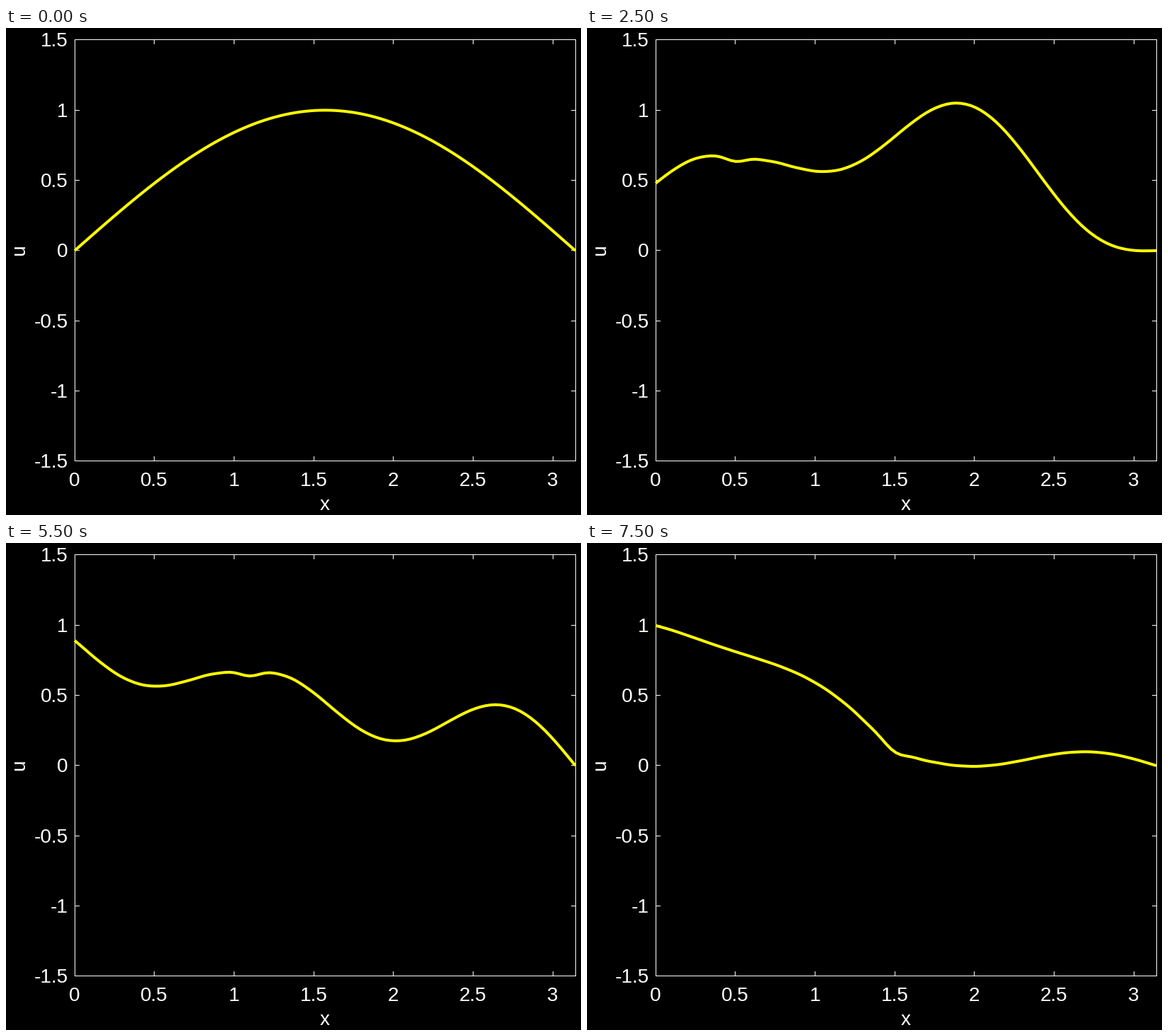
Animation, 813 px wide and 689 px high, one loop 8 s. Source, as a matplotlib script:

```python
import numpy as np
import matplotlib.pyplot as plt
from matplotlib.animation import FuncAnimation

W, H, DPI = 813, 689, 100
LEFT, RIGHT, TOP, BOTTOM = 97, 805, 17, 613
TICK = 7
FRAMES, STEP_MS, DT = 16, 500, 0.1
MODES = 40


def pt(px):
    return px * 72 / DPI


def sx(x):
    return LEFT + x / np.pi * (RIGHT - LEFT)


def sy(u):
    return BOTTOM + (u + 1.5) / 3 * (TOP - BOTTOM)


def wave(x, t):
    """Sine series for u_tt = u_xx with u(0,t) = sin t, u(pi,t) = 0,
    u(x,0) = sin x and u_t(x,0) = sin 4x."""
    u = (1 - x / np.pi) * np.sin(t)
    u += ((1 - t / np.pi) * np.cos(t) - np.sin(t) / np.pi) * np.sin(x)
    u += np.sin(4 * t) / 4 * np.sin(4 * x)
    n = np.arange(2, MODES + 1)
    b = 2 / (np.pi * (n**2 - 1)) * (np.sin(t) / n - np.sin(n * t))
    return u + b @ np.sin(np.outer(n, x))


fig = plt.figure(figsize=(W / DPI, H / DPI), dpi=DPI, facecolor="black")
ax = fig.add_axes([0, 0, 1, 1])
ax.set(xlim=(0, W), ylim=(H, 0))
ax.axis("off")


def rule(xs, ys):
    ax.plot(xs, ys, color="white", lw=pt(1), solid_capstyle="butt",
            snap=False, zorder=1)


def hline(x0, x1, y):
    y = np.ceil(round(y, 6)) - 0.5  # centre of a pixel row
    rule([x0, x1], [y, y])


def vline(x, y0, y1):
    x = np.floor(round(x, 6)) + 0.5  # centre of a pixel column
    rule([x, x], [y0, y1])


def label(x, y, s, **kw):
    ax.text(x, y, s, color="white", family="Liberation Sans",
            size=pt(28), va="baseline", **kw)


for y in (TOP, BOTTOM):
    hline(LEFT, RIGHT + 1, y)
for x in (LEFT, RIGHT):
    vline(x, TOP, BOTTOM)

for v in np.arange(0, 3.1, 0.5):
    x = sx(v)
    vline(x, BOTTOM, BOTTOM - TICK)
    vline(x, TOP, TOP + TICK - 1)
    label(x, 648, f"{v:g}", ha="center")

for v in np.arange(-1.5, 1.6, 0.5):
    y = sy(v)
    hline(LEFT, LEFT + TICK, y)
    hline(RIGHT, RIGHT - TICK + 1, y)
    label(87.5, y + 9.5, f"{v:g}", ha="right")

label(450.7, 682, "x", ha="center")
label(26.5, 314.5, "u", ha="center", rotation=90, rotation_mode="anchor")

grid = np.linspace(0, np.pi, 101)
curve, = ax.plot([], [], color="#ffff00", lw=pt(4), solid_capstyle="butt",
                 solid_joinstyle="round", zorder=3)


def update(i):
    curve.set_data(sx(grid), sy(wave(grid, i * DT)))
    return curve,


anim = FuncAnimation(fig, update, frames=FRAMES, interval=STEP_MS,
                     repeat=True, repeat_delay=0, blit=False)
plt.show()
```
